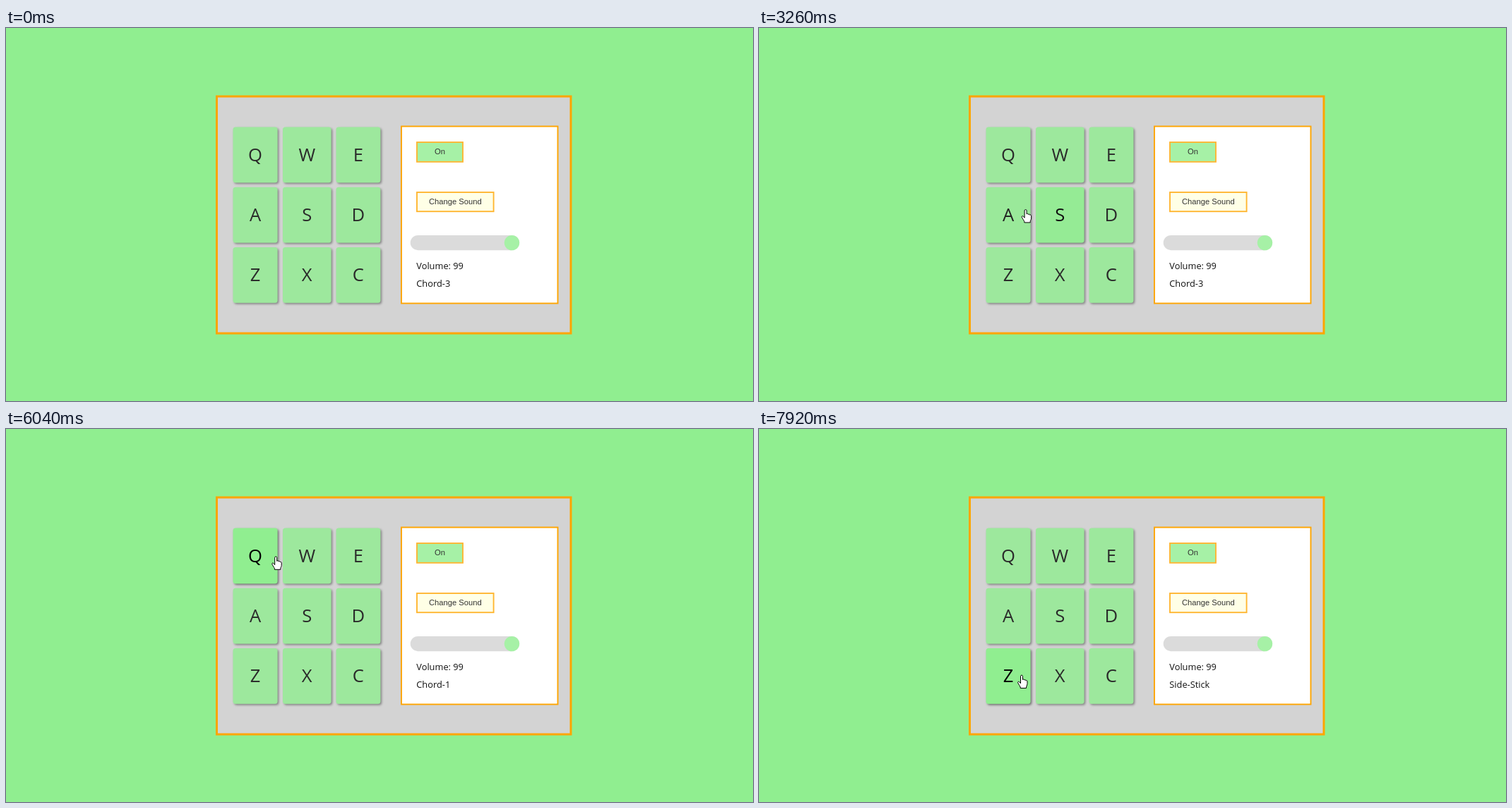
An HTML page for the animation above (7990 ms loop, 1058x529 px).

```html
<!DOCTYPE html>
<html lang="en">
<head>
<meta charset="utf-8">
<title>Drum pad</title>
<style>
  html, body { margin: 0; width: 100%; height: 100%; overflow: hidden; background: #90ee90; }
  svg { display: block; width: 100%; height: 100%; }
  .key { opacity: .8; }
  .key rect { fill: #90ee90; filter: url(#shade); }
  .key text { font: 25.6px "Open Sans", "Noto Sans", sans-serif; text-anchor: middle; }
  .soft { opacity: .8; }
  .button rect { stroke: orange; stroke-width: 1.9; }
  .button text { font: 11.2px "Liberation Sans", Arial, sans-serif; text-anchor: middle; }
  .label { font: 12.8px "Open Sans", "Noto Sans", sans-serif; fill: #111; }
  #cursor path { fill: #fff; stroke: #000; stroke-linejoin: round; }
</style>
</head>
<body>
<svg viewBox="0 0 1058 529">
  <defs>
    <filter id="shade" x="-20%" y="-20%" width="140%" height="140%">
      <feDropShadow dx="1.8" dy="1.8" stdDeviation="1.5" flood-color="#707070"/>
    </filter>
  </defs>
  <rect x="298.5" y="97" width="501.5" height="336" fill="#d3d3d3" stroke="orange" stroke-width="3"/>
  <g id="pad"></g>
  <rect x="560" y="139.5" width="221.5" height="251" fill="#fff" stroke="orange" stroke-width="1.9"/>
  <g class="soft button">
    <rect x="582" y="162" width="65" height="27.8" fill="#90ee90"/>
    <text x="614.5" y="179.3">On</text>
  </g>
  <g class="soft button">
    <rect x="582" y="233" width="108.6" height="27.2" fill="#ffffe0"/>
    <text x="636.3" y="250.2">Change Sound</text>
  </g>
  <g class="soft">
    <rect x="572.7" y="294" width="154.5" height="21.2" rx="10.6" fill="#d3d3d3"/>
    <circle cx="716.5" cy="304.6" r="10.7" fill="#90ee90"/>
  </g>
  <text class="label" x="581.3" y="341.6">Volume: 99</text>
  <text class="label" id="sound" x="581.3" y="367">Chord-3</text>
  <g id="cursor" visibility="hidden">
    <path id="arrow" d="M0 0V14L3.3 11L5.4 16L7.6 15L5.5 10.3H10Z"/>
    <path id="hand" d="M-1.5 1.5C-1.5-.3 1.5-.3 1.5 1.5V6.5C2 5.6 4 5.8 4 7.2C4.5 6.3 6 6.6 6.1 7.9C6.6 7.2 8 7.6 8 9V12.5C8 14.5 6.6 15.5 6.6 17V18.5H-1.8V17C-2.5 15.5-4 13.5-5.3 11C-6 9.6-4.2 8.6-3 10L-1.5 11.8Z"/>
  </g>
</svg>
<script>
const LOOP = 7990, FADE = 100, ENTER = 360;
const byId = id => document.getElementById(id);

// Pad layout
const columns = [[321.5, 63], [392, 68.5], [467.5, 62.8]];
const keys = [..."QWEASDZXC"].map((letter, i) => {
  const [x, w] = columns[i % 3];
  const y = 140.5 + 85.2 * Math.floor(i / 3), h = 78.8;
  byId("pad").insertAdjacentHTML("beforeend",
    `<g class="key"><rect x="${x}" y="${y}" width="${w}" height="${h}" rx="3.5"/>` +
    `<text x="${x + w / 2}" y="${y + 48.2}">${letter}</text></g>`);
  return { x, y, w, h, el: byId("pad").lastElementChild };
});

// Sound names as they are played
const sounds = [
  [0, "Chord-3"], [1850, "Chord-1"], [2580, "Chord-2"], [2960, "Chord-3"],
  [3410, "Shaker"], [3720, "Open-HH"], [4270, "Closed-HH"],
  [4740, "Punchy-Kick"], [5120, "Side-Stick"], [5580, "Snare"],
  [5960, "Chord-1"], [6270, "Chord-2"], [6500, "Chord-3"],
  [6920, "Shaker"], [7150, "Open-HH"], [7370, "Closed-HH"],
  [7610, "Snare"], [7760, "Side-Stick"]
];

// Pointer moves: start, end, target x, y, optional bend point
const moves = [
  [ENTER, 1000, 366, 184, 560, 30], [2080, 2390, 433, 187], [2640, 2860, 498, 185],
  [3000, 3340, 360, 268], [3410, 3660, 424, 270], [3760, 4110, 498, 270],
  [4310, 4670, 358, 346], [4770, 4970, 416, 338], [5130, 5430, 498, 346],
  [5590, 5820, 364, 180], [5960, 6190, 432, 183], [6280, 6440, 498, 186],
  [6520, 6740, 360, 268], [6930, 7080, 426, 270], [7160, 7300, 499, 272],
  [7400, 7560, 500, 348], [7620, 7690, 436, 346], [7765, 7850, 372, 349]
];

// Bursts of screen updates: first, last, count
const bursts = [
  [0, 0, 1], [ENTER, 1000, 9], [2150, 2390, 4], [2580, 3340, 11], [3410, 4190, 11],
  [4270, 4970, 10], [5120, 5430, 5], [5580, 5820, 4], [5960, 6740, 11],
  [6920, 7690, 11], [7760, 7920, 3]
];

const latest = (list, t) => list.filter(item => item[0] <= t).pop();

function heldTime(t) {
  const [start, end, count] = latest(bursts, t);
  if (count < 2) return start;
  const step = (end - start) / (count - 1);
  return start + step * Math.min(count - 1, Math.floor((t - start) / step + .2));
}

function pointerAt(t) {
  let x = 800, y = 337;
  for (const [start, end, tx, ty, bx = (x + tx) / 2, by = (y + ty) / 2] of moves) {
    if (t < start) break;
    const u = Math.min(1, (t - start) / (end - start));
    const s = u * u * (3 - 2 * u), r = 1 - s;
    x = r * r * x + 2 * r * s * bx + s * s * tx;
    y = r * r * y + 2 * r * s * by + s * s * ty;
  }
  return { x, y };
}

const inside = (k, p) => p.x >= k.x && p.x <= k.x + k.w && p.y >= k.y && p.y <= k.y + k.h;

function draw(t) {
  const now = heldTime(t), p = pointerAt(now);
  const trail = Array.from({ length: 10 }, (_, i) => pointerAt(now - i * FADE / 10));
  for (const k of keys) {
    const lit = trail.filter(q => inside(k, q)).length / trail.length;
    k.el.style.opacity = .8 + .2 * lit;
  }
  const over = keys.some(k => inside(k, p));
  byId("hand").style.display = over ? "" : "none";
  byId("arrow").style.display = over ? "none" : "";
  byId("cursor").setAttribute("transform", `translate(${p.x.toFixed(1)} ${p.y.toFixed(1)})`);
  byId("cursor").setAttribute("visibility", now >= ENTER ? "visible" : "hidden");
  byId("sound").textContent = latest(sounds, t)[1];
}

function tick() {
  draw(performance.now() % LOOP);
  requestAnimationFrame(tick);
}
tick();
</script>
</body>
</html>
```
